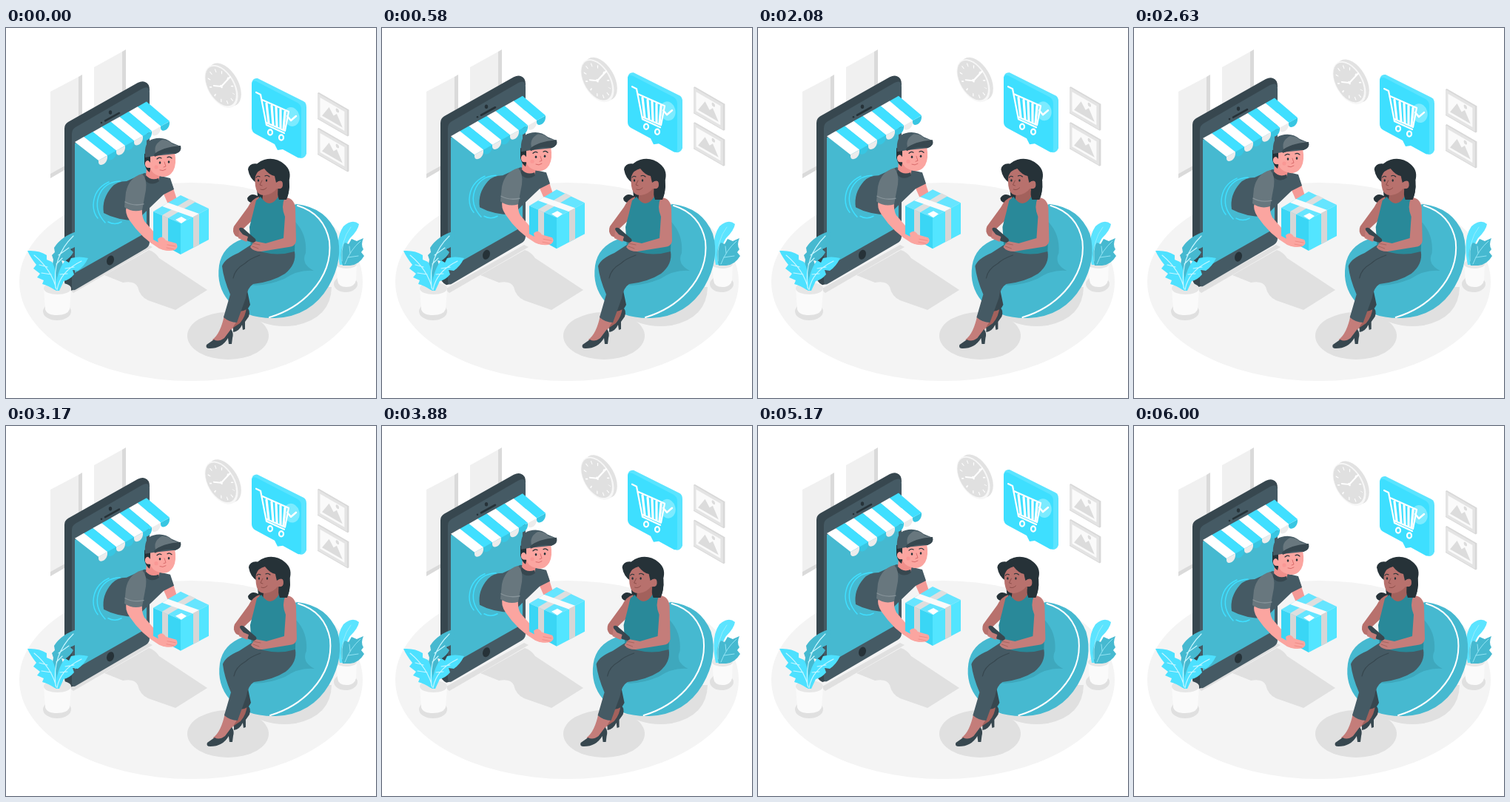
An HTML page that plays this animation: 500 px wide and 500 px high, repeating every 6.04 s.

```html
<!DOCTYPE html>
<html lang="en">
<head>
<meta charset="utf-8">
<title>Online delivery</title>
<style>
html, body { margin: 0; width: 100%; height: 100%; overflow: hidden; background: #fff; }
svg { display: block; width: 100vw; height: 100vh; }
.line { fill: none; stroke-linecap: round; stroke-linejoin: round; }
.white { stroke: #fff; }
</style>
</head>
<body>
<svg viewBox="0 0 500 500">
  <!-- room -->
  <ellipse cx="250" cy="343" rx="232" ry="134" fill="#f4f4f4"/>
  <g fill="#f0f0f0">
    <path d="M60 86L98 66V178L60 197Z"/>
    <path d="M119 53L157 32V150L119 160Z"/>
  </g>
  <g fill="#dadada">
    <path d="M98 66L103 63V178L60 203V197L98 176Z"/>
    <path d="M157 32L162 29V150H157Z"/>
  </g>
  <g fill="#e0e0e0">
    <path d="M85 353L192 293L198 296L91 358Z"/>
    <path d="M133 334L193 300Q202 303 207 311L272 354L229 381L192 368Q181 363 178 350Q174 341 158 344Z"/>
    <ellipse cx="300" cy="416" rx="55" ry="32"/>
    <path d="M325 386Q352 407 391 402Q439 392 440 350L380 350Z"/>
    <ellipse cx="459" cy="346" rx="16" ry="11"/>
    <ellipse cx="69" cy="383" rx="19" ry="12"/>
  </g>

  <!-- right plant -->
  <path d="M446 318H474L473 341Q471 350 460 350Q449 350 448 341Z" fill="#fafafa"/>
  <ellipse cx="460" cy="319" rx="14" ry="6" fill="#e6e6e6"/>
  <path d="M451 320Q444 285 456 268Q468 257 477 265Q476 273 465 284Q456 296 456 320Z" fill="#5ce4ff"/>
  <path d="M455 321Q449 301 458 290L463 292L467 285L474 288L483 284Q479 293 483 299L480 303L484 308Q477 320 465 321Z" fill="#46b9d0"/>
  <path class="line" stroke="#a5eefc" stroke-width=".8" d="M454 315Q452 287 466 269M458 319Q465 300 479 288M465 304L464 295M462 310L476 308"/>

  <g id="float">
    <!-- clock -->
    <g transform="matrix(.866 .5 0 1 291 79)">
      <circle cx="5" cy="-5" r="26" fill="#e2e2e2"/>
      <path d="M-18-18L-13-23L23 13L18 18Z" fill="#e2e2e2"/>
      <circle r="26" fill="#f7f7f7"/>
      <circle cx="-1" r="24" fill="#e0e0e0"/>
      <circle class="line white" r="19" stroke-width="4" stroke-dasharray="1.4 8.55" stroke-dashoffset=".7" style="stroke-linecap:butt"/>
      <path class="line white" stroke-width="1.8" d="M14-20L0 0L-12 5"/>
      <circle r="2" fill="#fff"/>
    </g>

    <!-- wall pictures -->
    <g id="picture" transform="matrix(.866 .5 0 1 421 88)">
      <path d="M0 0L2-2L49-2V33L47 35H0Z" fill="#d8d8d8"/>
      <path d="M0 0H46V34H0Z" fill="#e4e4e4"/>
      <path d="M4 4H42V30H4Z" fill="#fafafa"/>
      <path d="M7 27L18 10L25 18L30 13L39 27Z" fill="#dcdcdc"/>
      <circle cx="31" cy="8" r="2.6" fill="#dcdcdc"/>
    </g>
    <use href="#picture" y="48"/>

    <!-- cart bubble -->
    <path d="M332 75Q333 67 340 68L402 99Q406 101 406 107V170Q404 176 398 176L365 158Z" fill="#5ae4ff"/>
    <path d="M332 77Q332 70 338 72L394 101Q399 104 399 110V171Q399 177 394 175L374 164L367 165L363 157L337 143Q332 140 332 135Z" fill="#3edfff"/>
    <ellipse cx="386" cy="120" rx="10.500" ry="13" transform="rotate(-14 386 120)" fill="#7cebff"/>
    <g class="line white" stroke-width="2.2">
      <path d="M338 87L344 90L352 131L376 142M346 97L382 113L377 139L352 128"/>
      <path d="M352 102L355 128M359 105L361 131M365 107L366 133M371 110L371 135M377 113L375 137" stroke-width="3.2"/>
      <ellipse cx="357" cy="141" rx="3" ry="3.6"/>
      <ellipse cx="372" cy="148" rx="3" ry="3.6"/>
      <path d="M380 119L385 125L392 119" stroke-width="2.500"/>
    </g>

    <!-- phone -->
    <path d="M79 136Q79 130 84 127L178 74Q184 71 188 73Q194 75 194 84L91 354L87 355Q79 351 79 343Z" fill="#37474f"/>
    <path d="M89 143Q89 137 94 134L184 82Q194 77 194 87V289Q194 295 189 298L95 353Q89 357 89 349Z" fill="#455a64"/>
    <path d="M93 156L190 102V276L93 331Z" fill="#46b9d0"/>
    <ellipse cx="141" cy="314" rx="4.8" ry="6.7" transform="rotate(18 141 314)" fill="#263238"/>
    <path class="line" stroke="#263238" stroke-width="2.600" d="M134 125.500L153 115"/>
    <ellipse cx="141" cy="114" rx="2.200" ry="2.800" fill="#263238"/>
    <circle cx="129" cy="128" r="1.300" fill="#263238"/>
    <g id="awning"></g>

    <!-- portal and courier -->
    <g class="line" stroke="#40dfff" stroke-width="1.500">
      <path d="M154 207Q132 208 125 228Q119 247 134 263"/>
      <path d="M139 208Q119 217 118 239Q118 250 124 257"/>
      <path d="M138 262Q147 267 156 262"/>
    </g>
    <path d="M212 222L225 213L231 232L219 238Z" fill="#f49a96"/>
    <path d="M132 250Q129 231 143 215Q150 207 163 207L187 196L209 200L222 203L227 218L213 225L190 247L177 260Q150 260 132 250Z" fill="#455a64"/>
    <path d="M190 187L189 200Q197 210 206 207L209 194Z" fill="#f08f8b"/>
    <path d="M189 199L187 205Q196 215 207 207L206 203Q196 207 189 199Z" fill="#37474f"/>
    <path d="M163 241Q160 250 167 260Q183 284 207 298Q219 304 230 297L231 293L220 285L207 284L187 261Q183 254 184 243Z" fill="#fba5a0"/>
    <path d="M184 197Q166 202 162 222L160 242Q171 250 184 246L189 219Q191 204 184 197Z" fill="#68777e"/>
    <path class="line" stroke="#87949a" stroke-width="1.300" d="M161 235Q172 241 186 238"/>
    <path d="M187 170L187 183Q189 192 194 195L200 169Z" fill="#263238"/>
    <path d="M195 168L228 168Q231 184 226 193Q219 204 207 200Q197 197 195 189Q187 190 188 182Q191 176 195 182Z" fill="#fba5a0"/>
    <path d="M188 175Q186 153 199 150Q213 146 224 155L236 160Q238 167 229 170L200 173Z" fill="#455a64"/>
    <path d="M202 169Q199 157 211 151Q220 151 225 157L236 160L226 165Q211 163 202 169Z" fill="#68777e"/>
    <path d="M200 171Q210 161 236 159Q238 167 229 170Q216 167 201 174Z" fill="#37474f"/>
    <ellipse cx="208" cy="182" rx="1.300" ry="1.800" fill="#263238"/>
    <ellipse cx="220" cy="181" rx="1.300" ry="1.800" fill="#263238"/>
    <path class="line" stroke="#263238" stroke-width="1.200" d="M204 177Q207 174 210 176M218 175Q221 173 224 176"/>
    <path class="line" stroke="#d96c6c" d="M214 181L216 187L213 188M208 192Q212 194 216 191"/>
    <circle cx="203" cy="188" r="2.600" fill="#fa9895"/>

    <!-- parcel -->
    <path d="M199 248L236 226L274 244L236 264Z" fill="#66e5ff"/>
    <path d="M199 248L236 264V306L199 286Z" fill="#3ad6f5"/>
    <path d="M236 264L274 244V286L236 306Z" fill="#53e5ff"/>
    <path d="M211 253L248 231L256 235L219 257Z" fill="#dedede"/>
    <path d="M211 241L219 236L261 251L253 256Z" fill="#fafafa"/>
    <path d="M211 253L219 257V297L211 293Z" fill="#d6d6d6"/>
    <path d="M253 255L261 251V293L253 297Z" fill="#d6d6d6"/>
    <path d="M229 259L237 255L244 259L237 264Z" fill="#fff"/>
    <path d="M205 285Q211 279 216 287L230 291Q234 296 228 300Q217 303 207 297Z" fill="#fba5a0"/>
    <path class="line" stroke="#ed8984" stroke-width=".9" d="M218 293L229 295M217 297L227 299"/>
  </g>

  <!-- left plant -->
  <path d="M51 352H88L86 380Q83 388 69 388Q55 388 53 380Z" fill="#fafafa"/>
  <ellipse cx="69.500" cy="352" rx="18.500" ry="8" fill="#e6e6e6"/>
  <path d="M66 354Q60 329 64 313L62 307L66 303L65 297Q75 281 98 274Q99 287 93 296L87 299L91 303Q87 311 79 315L75 314L77 320Q70 331 70 354Z" fill="#46b9d0"/>
  <path d="M66 354Q57 348 49 346L51 341L42 337L46 332L37 325L41 320Q33 310 29 301Q45 300 55 307L55 313L62 316Q69 327 69 354Z" fill="#4de1ff"/>
  <path d="M67 355Q68 329 80 314L85 317L88 311Q99 308 111 311Q105 323 97 328L90 327L92 333Q85 341 78 342L72 355Z" fill="#4de1ff"/>
  <path class="line" stroke="#c8f6ff" stroke-width="1.100" d="M68 353Q62 327 38 307M67 351Q62 309 91 281M69 354Q73 329 102 315M61 333L48 331M56 323L45 320M73 333L83 332M80 325L92 323M68 319L76 311M71 307L85 297"/>

  <g id="sway">
    <!-- bean bag -->
    <path d="M393 238Q433 243 447 278Q457 312 436 349Q412 390 364 392Q321 393 301 369Q284 349 288 321Q292 295 320 285L345 276L365 244Z" fill="#46b9d0"/>
    <path d="M391 262Q407 279 405 304Q398 319 416 328Q395 326 376 339Q349 350 330 347L350 303Z" fill="#3ea8bd"/>
    <path class="line white" stroke-width="2" d="M394 240Q430 251 437 288Q441 325 413 356Q390 381 356 391"/>

    <!-- far leg -->
    <path d="M312 382L325 376L326 392L316 404L306 406Z" fill="#a3615c"/>
    <path d="M307 405L316 399Q324 390 325 377Q331 381 328 390L323 397L323 407L320 408L319 401Q315 410 307 411Z" fill="#37474f"/>
    <path d="M340 327L324 345L330 374Q327 382 316 383L307 345Z" fill="#37474f"/>

    <!-- near leg -->
    <path d="M295 388L312 396L300 415Q291 428 281 425L279 421Q290 413 295 388Z" fill="#c47d7a"/>
    <path d="M271 428L281 421Q287 425 295 419L304 407Q308 412 306 419L305 427L301 427L300 419Q292 433 275 433Q269 433 271 428Z" fill="#37474f"/>
    <path d="M331 293L390 302Q393 319 377 332Q360 343 334 346Q326 351 324 365L312 398Q302 398 294 391L303 360Q294 339 292 322Q295 312 314 304Z" fill="#455a64"/>
    <path class="line" stroke="#37474f" stroke-width="1.200" d="M343 307Q329 312 323 318Q309 326 307 338"/>

    <!-- hair behind -->
    <path d="M342 184Q329 181 327 191Q329 203 338 209L340 227Q331 222 326 230Q326 236 336 237L352 235L379 232Q386 214 381 199Z" fill="#263238"/>
    <!-- arms and torso -->
    <path d="M342 228Q332 231 327 242L308 268Q305 275 310 281L326 288L331 283L321 271L339 254Z" fill="#b8716d"/>
    <path d="M348 215L346 236Q357 245 370 231L366 211Z" fill="#a3615c"/>
    <path d="M344 228L338 233Q334 250 329 269L331 297Q360 311 390 302L391 266L387 235L369 226Q357 247 344 228Z" fill="#298999"/>
    <path d="M377 229Q389 229 391 243L392 288Q391 295 382 296L345 302Q334 302 330 296L336 288L351 291L375 284L377 255Q371 241 377 229Z" fill="#c47d7a"/>
    <path d="M315 271Q318 268 322 272L337 285Q339 289 334 290L327 288L316 276Z" fill="#37474f"/>
    <path d="M315 273L320 279L327 282L325 289L314 284Z" fill="#c47d7a"/>
    <path class="line" stroke="#a3615c" stroke-width=".9" d="M333 291L343 293M333 295L341 298"/>

    <!-- head -->
    <path d="M338 196Q335 207 338 218Q341 227 350 226Q361 224 366 217Q374 220 375 211Q373 204 366 208L363 194L348 187Z" fill="#b8716d"/>
    <path d="M337 200Q340 192 349 190Q356 199 363 200L365 209Q374 202 374 212Q374 218 368 217Q366 225 369 232L379 232Q384 220 382 208Q387 193 376 184Q364 174 349 178Q338 181 337 190Z" fill="#263238"/>
    <ellipse cx="341" cy="206" rx="1.200" ry="1.700" fill="#263238"/>
    <ellipse cx="352" cy="206" rx="1.200" ry="1.700" fill="#263238"/>
    <path class="line" stroke="#263238" stroke-width="1.100" d="M338 202Q340 199 343 201M350 200Q353 198 356 201"/>
    <path class="line" stroke="#8d4e4a" d="M346 206L343 212L346 213M344 218Q348 220 352 216"/>
  </g>
</svg>
<script>
const $ = id => document.getElementById(id);
const LOOP = 6040, FLOAT = 1500, SWAY = 6000, DELAY = 1000;
const shake = [0, -1, 2, -4, 4, -4, 4, -4, 2, -1, 0];

// Striped awning with a scallop under each stripe
let stripes = '';
for (let i = 7; i >= 0; i--) {
  const x = 93 + i * 12.1, y = 154 - i * 6.8;
  const bx = 125 + i * 12, by = 179 - i * 6.6;
  const [top, flap] = i % 2 ? ['#40dfff', '#38c6e2'] : ['#fff', '#ececec'];
  stripes += `<path fill="${flap}" d="M${bx} ${by}v2c0 8 12 3 12-6v-2.600z"/>` +
    `<path fill="${top}" d="M${x} ${y}l12.200-6.900L${bx + 12.1} ${by - 6.7}L${bx} ${by}z"/>`;
}
$('awning').innerHTML = stripes;

function draw(now) {
  const t = now % LOOP;
  const lift = 10 * (1 - Math.abs(1 - (t % FLOAT) / FLOAT * 2));
  const step = Math.max(0, t - DELAY) / SWAY * 10, i = Math.floor(step);
  const shift = shake[i] + (shake[i + 1] - shake[i]) * (step - i);
  $('float').setAttribute('transform', `translate(0 ${-lift})`);
  $('sway').setAttribute('transform', `translate(${shift} 0)`);
}

const start = performance.now();
function tick() {
  draw(performance.now() - start);
  requestAnimationFrame(tick);
}
tick();
</script>
</body>
</html>
```
